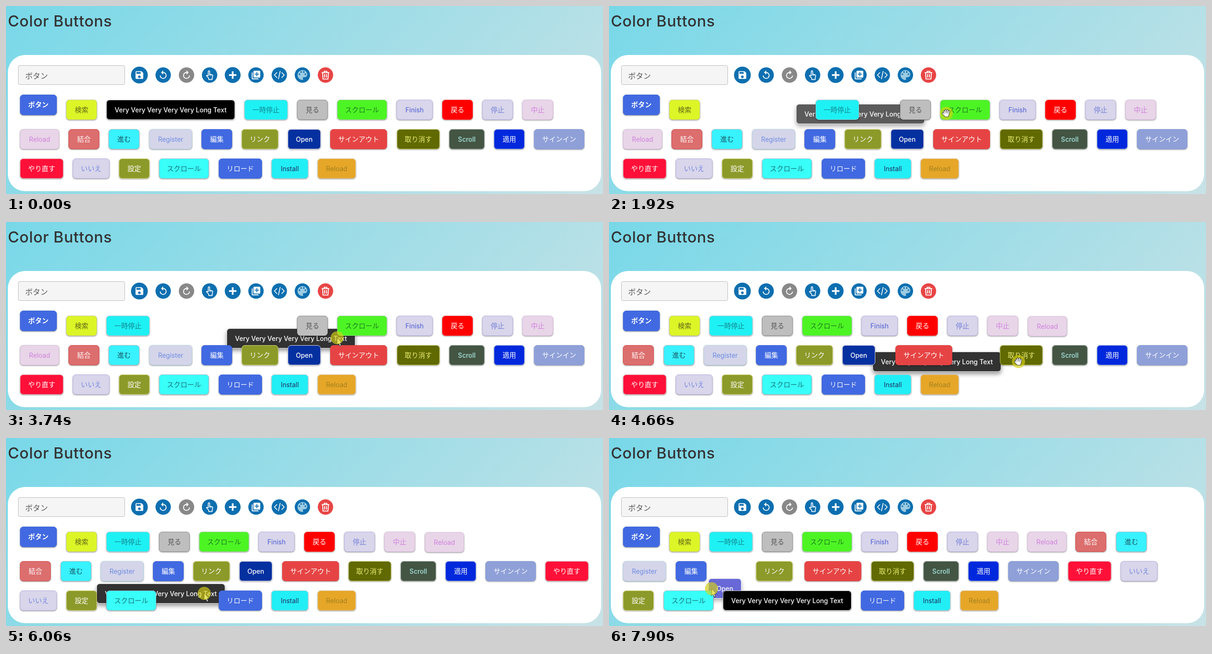
Write an HTML page that moves like this. It is 1280 px wide and 403 px high and loops after 8000 ms.

```html
<!DOCTYPE html>
<html lang="ja">
<head>
<meta charset="utf-8">
<title>Color Buttons</title>
<style>
html, body { margin: 0; width: 100%; height: 100%; overflow: hidden; }
body {
  position: relative;
  background: linear-gradient(135deg, #78d8e8, #c8e2e6);
  font-family: Inter, "Noto Sans CJK JP", "Noto Sans CJK", sans-serif;
}
h1 {
  position: absolute; left: 4px; top: 12px; margin: 0;
  font-size: 33px; line-height: 40px; font-weight: 500; letter-spacing: .65px; color: #333; white-space: nowrap;
}
.card {
  position: absolute; left: 4px; top: 105px; width: 1272px; height: 292px;
  border-radius: 37px; background: #fff;
}
.field {
  position: absolute; left: 26px; top: 127px; width: 213px; height: 40px; padding-left: 14px;
  border: 1px solid #bbb; border-radius: 4px; background: #f5f5f5;
  font: 300 16.3px/43px "Noto Sans CJK JP", "Noto Sans CJK", sans-serif; color: #555;
}
svg { position: absolute; left: 0; top: 0; overflow: visible; }
#board { position: absolute; inset: 0; z-index: 1; }
.btn {
  position: absolute; left: 0; top: 0; z-index: 1; box-sizing: border-box; height: 43px;
  border: 1px solid; border-radius: 7px; box-shadow: 0 1px 3px rgba(0, 0, 0, .45);
  font-size: 14px; line-height: 41px; text-align: center; white-space: nowrap;
}
.btn.jp { font-family: "Noto Sans CJK JP", "Noto Sans CJK", sans-serif; font-size: 14.6px; line-height: 39px; }
.btn.drag { z-index: 0; box-shadow: 0 5px 10px rgba(0, 0, 0, .5); }
#cursor { z-index: 5; }
</style>
</head>
<body>
<h1>Color Buttons</h1>
<div class="card"></div>
<div class="field">ボタン</div>
<svg id="tools" width="1280" height="180"></svg>
<div id="board"></div>
<svg id="cursor" width="1" height="1">
  <path id="arrow" d="M0 0V15L3.5 12 6 18 8.5 17 6 11H10.5Z" fill="#fff" stroke="#222"/>
  <circle id="press" r="14" fill="rgb(215,210,20)" fill-opacity=".65"/>
  <g id="hand" fill="#fff" stroke-linecap="round" stroke-linejoin="round">
    <path id="palm" d="M-5-4-3 3M-1.8-6.5-1 2M2-6.5 1.5 2M5.5-4.5 4 3M-7.5 0-3 5M-3 2H4L3 6H-2Z"/>
  </g>
</svg>
<script>
const LOOP = 8000, GAP = 20.2, ROWS = [201, 264, 327];
const GRAB = 1540, DROP = 6680, REGRAB = 7640, SLIDE = 250;
const $ = id => document.getElementById(id);

// dark outline under white fingers
const palm = $('palm').getAttribute('d');
$('hand').innerHTML = `<path d="${palm}" stroke="#222" stroke-width="4"/><path d="${palm}" stroke="#fff" stroke-width="2.3"/>`;

// toolbar: centre x, radius, colour, glyph size, path, stroke width (0 = filled), glyph colour, mirrored
const BLUE = '#0d6fb0';
const UNDO = 'M12 5V1L7 6l5 5V7a6 6 0 1 1-6 6H4a8 8 0 1 0 8-8z';
const hole = (x, y) => `M${x} ${y}a1.5 1.5 0 1 0 3 0 1.5 1.5 0 1 0-3 0`;
const tools = [
  [286, 18, BLUE, 22, 'M17 3H5a2 2 0 0 0-2 2v14a2 2 0 0 0 2 2h14a2 2 0 0 0 2-2V7zM12 19a3 3 0 1 1 0-6 3 3 0 0 1 0 6zM15 9H5V5h10z', 0],
  [337, 16.5, BLUE, 22, UNDO, 0],
  [387, 16.5, '#888', 22, UNDO, 0, '#fff', true],
  [436.5, 16.5, BLUE, 23, 'M9 14V4a1.6 1.6 0 0 1 3.2 0v6l5 1.2q2 .6 1.7 2.8L18 18v4h-8v-3l-5-5.5q1.5-2 4 .5M12.2 10v3M15 11v2.5', 1.7],
  [486, 17, BLUE, 24, 'M12 4v16M4 12h16', 3.6],
  [536, 16.5, BLUE, 22, 'M4 6H2v14c0 1.1.9 2 2 2h14v-2H4zM20 2H8a2 2 0 0 0-2 2v12c0 1.1.9 2 2 2h12a2 2 0 0 0 2-2V4a2 2 0 0 0-2-2zM19 11h-4v4h-2v-4H9V9h4V5h2v4h4z', 0],
  [586, 16.5, BLUE, 23, 'M7 6l-6 6 6 6M17 6l6 6-6 6M14 3l-4 18', 1.8],
  [635.5, 16.5, BLUE, 28, 'M12 3a9 9 0 0 0 0 18q1.5 0 1.5-1.5c0-.9-.8-1.1-.8-2q0-1.5 1.5-1.5H16a5 5 0 0 0 5-5c0-4.4-4-8-9-8z'
    + hole(5, 10.5) + hole(8, 6.5) + hole(13, 6.5) + hole(16, 10.5), 0, '#9ccbe2'],
  [685, 16.5, '#e84545', 23, 'M3.5 6.5h17M9 6V3.5h6V6M5.5 7l1 14h11l1-14M10 10v7.5M14 10v7.5', 2]
];
$('tools').innerHTML = tools.map(([x, r, bg, size, d, line, ink = '#fff', flip]) => {
  const k = size / 24;
  const paint = line ? `fill="none" stroke="${ink}" stroke-width="${line}" stroke-linejoin="round"` : `fill="${ink}" fill-rule="evenodd"`;
  return `<circle cx="${x}" cy="148" r="${r}" fill="${bg}"/>
    <path transform="translate(${x} 148) scale(${flip ? -k : k} ${k}) translate(-12 -12)" d="${d}" ${paint}/>`;
}).join('');

// label, width, background, ink, border, weight, slide times
const specs = [
  ['検索', 66, '#dcf527', '#626b18', '#c9d66a', 300],
  ['Very Very Very Very Very Long Text', 275.8, '#000', '#fff', '#ddd', 500],
  ['一時停止', 92.5, '#1ef1f4', '#14858f', '#8fd4dc', 300, [1900]],
  ['見る', 66, '#bebebe', '#555', '#8c948c', 300, [1970, 3310, 3910]],
  ['スクロール', 107, '#4df424', '#1c7a20', '#8fd68a', 300, [2040, 3190, 3910]],
  ['Finish', 77.5, '#d9d5ea', '#4a5cd4', '#b9b4e4', 400, [2110, 3100, 3910]],
  ['戻る', 65.7, '#f00', '#fff', '#f33', 400, [2150, 3040, 3910]],
  ['停止', 65.7, '#d9d5ea', '#7480d8', '#b9b4e4', 300, [2170, 2800, 3910]],
  ['中止', 65.7, '#e8d5e8', '#d080dc', '#dcbfe0', 300, [2382, 2650, 3910]],
  ['Reload', 83.5, '#e8d5e8', '#d080dc', '#dcbfe0', 400, [3900]],
  ['結合', 66, '#dc6e6e', '#fff', '#e04444', 400, [3900]],
  ['進む', 66, '#38f2ff', '#1a5f6a', '#86c8d0', 300, [3900]],
  ['Register', 92, '#d5d5ea', '#6e8ce0', '#b4d6e8', 400, [3900]],
  ['編集', 66.2, '#4169e1', '#fff', '#4169e1', 400, [3900]],
  ['リンク', 78.8, '#8c9a2a', '#fff', '#d8d870', 400, [3900]],
  ['Open', 71, '#0530a0', '#fff', '#dde', 500, [3900]],
  ['サインアウト', 122.2, '#e64444', '#fff', '#e64444', 400, [4560]],
  ['取り消す', 92, '#606a00', '#eaea70', '#c8c860', 400, [4760]],
  ['Scroll', 75.6, '#445544', '#a8e8e0', '#8a9a8a', 500, [5438]],
  ['適用', 66, '#0028dc', '#fff', '#8fb0e8', 400, [5438]],
  ['サインイン', 108, '#8fa0d8', '#fff', '#7f9ae0', 400, [5438]],
  ['やり直す', 92.5, '#ff1038', '#fff', '#e8a0a8', 400, [5438]],
  ['いいえ', 78.5, '#d9d5ea', '#7088e0', '#b9b4e4', 300, [5438]],
  ['設定', 66, '#8c9a2a', '#fff', '#d8d870', 400, [5438]],
  ['スクロール', 107.4, '#38fff8', '#1a6f78', '#86c8d0', 300, [5438]],
  ['リロード', 93, '#4169e1', '#fff', '#4169e1', 400, [5516, 5800]],
  ['Install', 79, '#22eef5', '#203060', '#8fd4dc', 400],
  ['Reload', 82, '#e6a628', '#a08020', '#e0c080', 400]
];

function makeButton([label, w, bg, ink, edge, weight]) {
  const el = document.createElement('div');
  el.className = /^[A-Za-z ]+$/.test(label) ? 'btn' : 'btn jp';
  el.textContent = label;
  Object.assign(el.style, { width: Math.round(w) + 'px', background: bg, color: ink, borderColor: edge, fontWeight: weight });
  $('board').append(el);
  return el;
}
const place = (el, x, y) => { el.style.transform = `translate(${Math.round(x)}px, ${Math.round(y)}px)`; };

const lead = makeButton(['ボタン', 79, '#4169e1', '#fff', '#4169e1', 700]);
lead.style.height = '44px';
place(lead, 30, 190);

const items = specs.map(s => ({ el: makeButton(s), w: s[1], bg: s[2], slides: s[6] || [] }));
const black = items[1], open = items[15], link = items[14];

// wraps a list of buttons into rows
function flow(list, key) {
  let x = 129, row = 0;
  for (const it of list) {
    if (x + it.w > 1253) { x = 30.4; row++; }
    it[key] = [x, ROWS[row]];
    x += it.w + GAP;
  }
}
flow(items, 'home');
const rest = items.filter(it => it !== black);
flow([...rest.slice(0, 24), black, ...rest.slice(24)], 'end');

// where each button slides while the long one is carried past it
items.forEach((it, i) => {
  const [x, y] = it.home;
  const room = i < 9 ? black.w : i < 21 ? items[9].w : items[21].w;
  it.away = [x - room - GAP, y];
});
items[9].away = [898, 202];
items[21].away = [items[20].away[0] + items[20].w + GAP, ROWS[1]];

// pointer path: time, x, y
const path = [
  [200, 932, 355], [600, 720, 290], [1000, 453, 220], [1520, 453, 221], [1720, 545, 226],
  [1830, 637, 230], [1920, 722, 230], [2120, 985, 235], [2330, 1263, 242], [2450, 1263, 242],
  [2700, 1150, 247], [3140, 830, 252], [3540, 710, 248], [3740, 710, 248], [4100, 708, 297],
  [4460, 708, 297], [4900, 1080, 302], [5180, 1080, 302], [5380, 700, 310], [5470, 531, 319],
  [5560, 512, 319], [6000, 425, 333], [6780, 425, 333], [7400, 365, 285], [7660, 365, 285],
  [7810, 249, 322], [7900, 220, 323], [8000, 205, 324]
];
const mix = (a, b, p) => a + (b - a) * p;
const mix2 = (a, b, p) => [mix(a[0], b[0], p), mix(a[1], b[1], p)];
function pointer(t) {
  const i = Math.max(1, path.findIndex(p => p[0] >= t));
  const [a, b] = [path[i - 1], path[i]];
  const p = Math.max(0, (t - a[0]) / (b[0] - a[0]));
  return mix2(a.slice(1), b.slice(1), p);
}
function ease(u) {
  u = Math.min(1, Math.max(0, u));
  return 1 - (1 - u) ** 3;
}

function spot(it, t) {
  if (t >= DROP) {
    const shift = it === link ? (open.w + GAP) * ease((t - 7750) / SLIDE) : 0;
    return [it.end[0] + shift, it.end[1]];
  }
  const p = it.slides.reduce((sum, s, i) => sum + (i % 2 ? -1 : 1) * ease((t - s) / SLIDE), 0);
  return mix2(it.home, it.away, p);
}

function render(t) {
  const held = t >= REGRAB ? open : t >= GRAB && t < DROP ? black : null;
  const [cx, cy] = pointer(t);
  let over = cx > 1240;
  for (const it of items) {
    let [x, y] = spot(it, t);
    const carried = it === held;
    it.el.classList.toggle('drag', carried);
    if (carried) {
      const [gx, gy] = pointer(t - 90);
      [x, y] = it === black ? [gx - 237, gy - 20] : [gx - 36, gy - 21];
      const start = it === black ? GRAB : REGRAB;
      it.el.style.opacity = Math.min(.8, .5 + (t - start) / 2700);
    } else {
      it.el.style.opacity = 1;
      over = over || (cx >= x && cx <= x + it.w && cy >= y && cy <= y + 43);
    }
    place(it.el, x, y);
  }
  open.el.style.background = held === open ? '#0303bb' : open.bg;
  const show = (id, on) => { $(id).style.display = on ? '' : 'none'; };
  show('cursor', t >= 200);
  show('press', (t >= 1400 && t < DROP) || t >= 7480);
  show('hand', over);
  show('arrow', !over);
  $('cursor').style.transform = `translate(${cx}px, ${cy}px)`;
}

const begin = performance.now();
function tick() {
  render((performance.now() - begin) % LOOP);
  requestAnimationFrame(tick);
}
tick();
</script>
</body>
</html>
```
